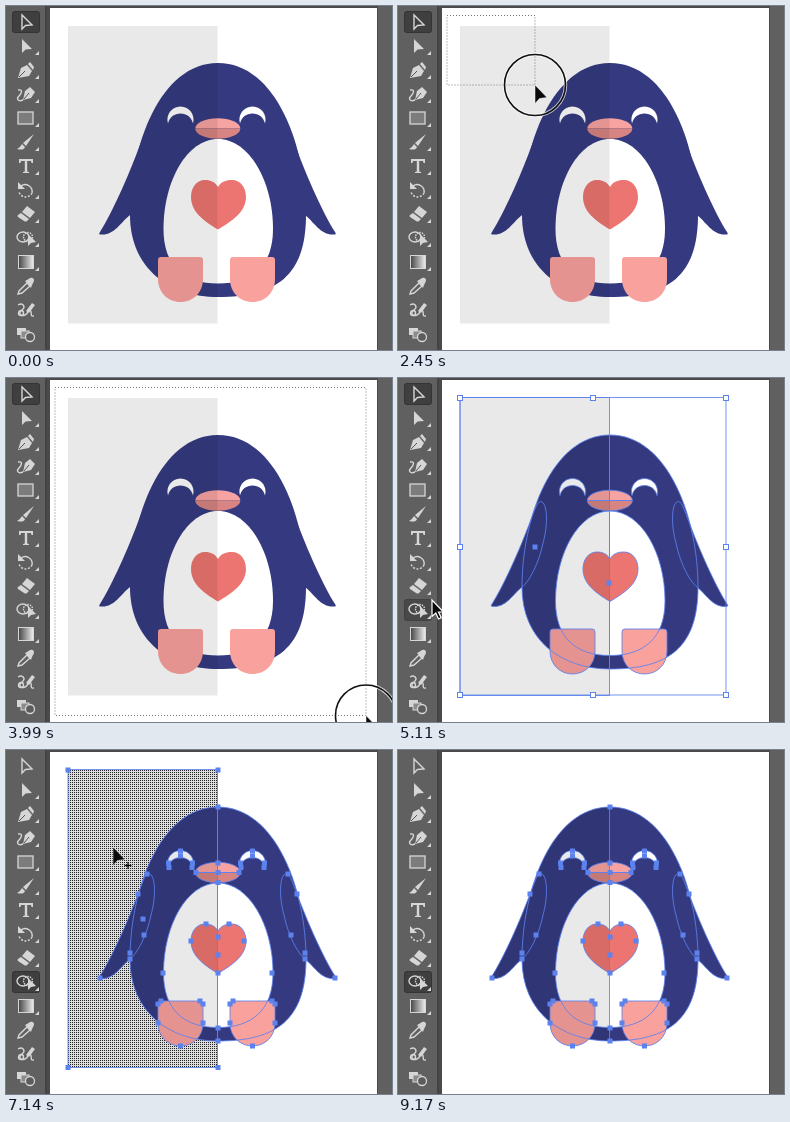
Write an HTML page that moves like this. It is 386 px wide and 344 px high and loops after 9380 ms.

```html
<!DOCTYPE html>
<html lang="en">
<head>
<meta charset="utf-8">
<title>Penguin shape builder</title>
<style>
html, body { margin: 0; width: 100%; height: 100%; overflow: hidden; background: #5f5f5f; }
svg { display: block; width: 386px; height: 344px; }
.icon { fill: #d6d6d6; stroke: none; }
.line { fill: none; stroke: #d6d6d6; stroke-width: 1.4; }
.edge { fill: none; stroke: #5c82ee; stroke-width: 1; stroke-opacity: .85; }
.dot { fill: #5c82ee; }
.handle { fill: #fff; stroke: #5c82ee; }
.tip { font: 11px Inter, "Liberation Sans", sans-serif; fill: #555; }
</style>
</head>
<body>
<svg id="stage" viewBox="0 0 386 344" xmlns="http://www.w3.org/2000/svg"></svg>
<script>
const LOOP = 9380, STEP = 70, AXIS = 211.5;
const stage = document.getElementById('stage');

// Penguin parts
const bodyD = 'M212 57C154 57 124 140 124 209C124 262 163 291 212 291C270 291 300 270 300 209C300 140 270 57 212 57Z';
const bellyD = 'M212 133C181 133 157.500 175 157.500 223C157.500 260 178 277.500 212 277.500S267 260 267 223C267 175 243 133 212 133Z';
const wingD = 'M132 144C136 134 139 123.500 142.500 123.500C150 124 150 148 145 165C141 185 131 204 124 209C114 217 108 230 94 228.500Q92.500 228 94 226C106 207 122 171 132 144Z';
const heartD = 'M212 181C209 176 205 174 199 174C190 174 185 182 185 191C185 206 198 215 212 223.500C226 215 240 206 240 191C240 182 235 174 226 174C219 174 215 176 212 181Z';
const footD = 'M-19.500 251H19.500Q22.500 251 22.500 254V273C22.500 287 12 296 0 296S-22.500 287 -22.500 273V254Q-22.500 251 -19.500 251Z';
const eyeD = 'M-12.500 117.500C-15 109 -9 100.500 0 100.500S15 109 12.500 117.500C11 111 6 107.500 0 107.500S-11 111 -12.500 117.500Z';
const beakTop = 'M189.300 122.500A22.500 10.300 0 0 1 234.300 122.500Z';
const beakLow = 'M189.300 122.500A22.500 10.300 0 0 0 234.300 122.500Z';

const path = (d, fill, move) =>
  `<path d="${d}"${fill ? ` fill="${fill}"` : ''}${move ? ` transform="${move}"` : ''}/>`;
const flip = `translate(${AXIS * 2}) scale(-1 1)`;
const shift = x => `translate(${x})`;
const NAVY = '#353a80', PINK = '#f9a19d';
const pair = (d, fill) => path(d, fill, shift(174.5)) + path(d, fill, shift(246.5));
const wings = fill => path(wingD, fill) + path(wingD, fill, flip);
const solid = path(bodyD, NAVY) + wings(NAVY);
const penguin = solid + path(bellyD, '#fff') + pair(footD, PINK) + pair(eyeD, '#fff') +
  path(beakTop, '#f7a3a1') + path(beakLow, '#d88482') + path(heartD, '#ed7571');
const edges = path(bodyD) + wings() + path(bellyD) + pair(footD) + pair(eyeD) +
  path(beakTop) + path(beakLow) + path(heartD);

// Selection marks
const square = (x, y, s, cls) =>
  `<rect x="${x - s / 2}" y="${y - s / 2}" width="${s}" height="${s}" class="${cls}"/>`;
const dots = list => list.map(([x, y]) => square(x, y, 5, 'dot')).join('');
const sides = [[141, 124], [132, 144], [138, 185], [124, 203], [124, 209], [94, 228],
  [157, 223], [190, 122.5], [185, 191], [200, 174]];
const middle = [57, 113, 122.5, 132.5, 187, 205, 223, 278, 291].map(y => [212, y]);
const local = [[-19.5, 251], [19.5, 251], [-22.5, 254], [22.5, 254], [-22.5, 273], [22.5, 273],
  [0, 296], [-12, 113], [-11.5, 117.5], [12, 113], [11.5, 117.5], [0, 101], [0, 106]];
const anchors = dots([
  ...sides, ...sides.map(([x, y]) => [AXIS * 2 - x, y]), ...middle,
  ...[174.5, 246.5].flatMap(c => local.map(([x, y]) => [c + x, y]))
]);
const handles = [62, 195, 328].flatMap(x => [20, 169, 317].map(y => [x, y]))
  .filter(([x, y]) => x !== 195 || y !== 169)
  .map(([x, y]) => square(x, y, 5, 'handle')).join('');

// Toolbar icons, each around its own centre
const arrowD = 'M-4 -7V7L-.5 3.500L6 3Z';
const icons = [
  `<path class="line" d="${arrowD}"/>`,
  `<path class="icon" d="${arrowD}"/>`,
  '<path class="icon" d="M-8 8L-5 -2L1 -5L6 1L3 6Z"/><path class="icon" d="M2 -6L4 -8L8 -3L7 0Z"/><path d="M-7 7L-1 1" stroke="#555"/>',
  '<path class="icon" d="M-3 6L-1 -3L4 -7L9 -2L5 4Z"/><path d="M-2 5L3 -1" stroke="#555"/><path class="line" d="M-8 -4C-3 -5 -4 -1 -7 2S-8 8 -3 6"/>',
  '<rect x="-8" y="-6" width="15" height="12" fill="#7c7c7c" stroke="#d6d6d6" stroke-width="1.300"/>',
  '<path class="icon" d="M8 -8L0 4L-3 1Z"/><path class="icon" d="M-4 2L-1 5C-2 8 -5 8 -9 7Q-6 6 -4 2Z"/>',
  '<path class="icon" d="M-7 -7H7V-3H5.500L5 -5H1.200V5.500L3 6V7H-3V6L-1.200 5.500V-5H-5L-5.500 -3H-7Z"/>',
  '<path class="line" d="M-5 -4A7 7 0 0 1 6 3"/><path class="line" stroke-dasharray="2 1.500" d="M6 3A7 7 0 0 1 -7 2"/><path class="icon" d="M-8 -8V-1H-1Z"/>',
  '<path class="icon" d="M1 -8L9 -2L4 4L-4 -2Z"/><path class="icon" d="M-5 -1L3 5L1 7Q0 8 -2 7L-8 3Q-9 2 -8 1Z"/>',
  '<ellipse class="line" cx="-3" cy="-1" rx="6" ry="5"/><circle class="line" cx="2" cy="-1" r="4.500" stroke-dasharray="1.500 1"/><path class="icon" d="M2 -4V8L5 5L10 4Z"/>',
  '<rect x="-7.500" y="-6.500" width="15" height="13" fill="url(#fade)" stroke="#d6d6d6"/>',
  '<path class="line" d="M-8 8L-7 5L1 -3L4 0L-4 7Z"/><path class="icon" d="M-1 -5L1 -6L4 -8Q8 -9 8 -5L6 -1L5 2Z"/>',
  '<path class="line" d="M-8 -5C-3 -8 0 -3 -4 0S-6 7 -1 5S1 -2 4 0S3 7 8 6"/><circle class="line" cx="-5" cy="3" r="2.500"/><path class="icon" d="M0 1L6 -7L9 -5L3 3Z"/>',
  '<rect class="icon" x="-9" y="-6" width="9" height="7"/><rect x="-5" y="-3" width="8" height="7" fill="#8b8b8b" stroke="#d6d6d6"/><circle cx="4" cy="3" r="4.500" fill="#5c5c5c" stroke="#d6d6d6" stroke-width="1.300"/>'
];
const iconY = i => i ? 40 + (i - 1) * 24 : 16;
const plainTools = [0, 11, 12, 13];
const toolbar = icons.map((art, i) => {
  const corner = plainTools.includes(i) ? '' : '<path class="icon" d="M13 5V9H9Z"/>';
  return `<g transform="translate(20 ${iconY(i)})">${art}${corner}</g>`;
}).join('');
const button = (id, i) =>
  `<rect id="${id}" x="6.500" y="${iconY(i) - 10.5}" width="27" height="21" rx="2" fill="#3f3f3f" stroke="#343434"/>`;

stage.innerHTML = `
<defs>
  <pattern id="mesh" width="2" height="2" patternUnits="userSpaceOnUse">
    <rect width="2" height="2" fill="#dcdcdc"/><rect width="1" height="1" fill="#222"/>
  </pattern>
  <linearGradient id="fade"><stop stop-color="#444"/><stop offset="1" stop-color="#f0f0f0"/></linearGradient>
  <clipPath id="shape">${solid}${pair(footD, PINK)}</clipPath>
</defs>
<rect width="386" height="344" fill="#606060"/>
<rect x="40" width="332" height="344" fill="#4a4a4a"/>
<rect x="44" y="2" width="327" height="342" fill="#fff"/>
<rect x="39" width="2" height="344" fill="#444"/>
${button('pickBtn', 0)}${button('eraseBtn', 8)}${button('buildBtn', 9)}
${toolbar}
<rect id="shade" x="62" y="20" width="149.500" height="297.500" fill="#e9e9e9"/>
<rect id="hatch" x="62" y="20" width="149.500" height="297.500" fill="url(#mesh)"/>
${penguin}
<rect x="62" y="20" width="149.500" height="298" fill="#000" opacity=".086" clip-path="url(#shape)"/>
<g id="outline" class="edge">${edges}<path d="M211.5 57V291"/></g>
<rect id="panel" class="edge" x="62" y="19.500" width="149.500" height="298"/>
<g id="bounds"><rect class="edge" x="62" y="19.500" width="266" height="297.500"/>${handles}${dots([[137, 169], [211, 205]])}</g>
<g id="points">${anchors}</g>
<g id="corners">${dots([[62, 20], [212, 20], [62, 317.5], [212, 317.5], [137, 169]])}</g>
<rect id="marquee" x="49" y="9.500" fill="none" stroke="#777" stroke-dasharray="1 2"/>
<g id="tooltip"><rect x="29" y="231" width="123" height="17" fill="#c8c8c8"/><text x="36" y="243.500" class="tip">Eraser Tool (Shift+E)</text></g>
<g id="cursor">
  <g id="ring" fill="none"><circle r="30.500" stroke="#fff" stroke-width="3.500" opacity=".7"/><circle r="30.500" stroke="#111" stroke-width="1.600"/></g>
  <path id="toolArrow" d="M0 0V18.500L4.500 13.500L12 12.500Z" fill="#0a0a0a" stroke="#fff" stroke-width=".5"/>
  <path id="sysArrow" d="M0 0V16.500L3.800 13L6.500 19L9.200 17.800L6.500 12H11.500Z" fill="#0a0a0a" stroke="#fff" stroke-width="1.200"/>
  <path id="minus" d="M11.500 18.500H18.500" stroke="#111" stroke-width="1.300"/>
  <path id="plus" d="M15 15V22" stroke="#111" stroke-width="1.300"/>
</g>`;

const el = {};
stage.querySelectorAll('[id]').forEach(n => { el[n.id] = n; });

// Cursor path: time, x, y
const route = [
  [980, 112, -24], [1540, 72, 10], [1890, 48.5, 9.5], [2030, 48.5, 9.5],
  [2450, 137, 79], [3010, 320, 285], [3500, 360, 337.5], [4060, 360, 337.5],
  [4270, 215, 290], [4550, 60, 232], [4690, 60, 232], [5110, 34, 222],
  [5250, 22, 228], [5530, 22, 228], [5950, 24, 206], [6230, 24, 206],
  [6510, 57, 153], [7140, 107, 97], [8540, 107, 97], [8820, 305, 303], [8890, 370, 370]
];

// Slope at a key; zero where the cursor rests
function slope(i, k) {
  const a = route[i - 1], b = route[i], c = route[i + 1];
  if (!a || !c) return 0;
  const before = (b[k] - a[k]) / (b[0] - a[0]);
  const after = (c[k] - b[k]) / (c[0] - b[0]);
  return before * after <= 0 ? 0 : 2 * before * after / (before + after);
}

function cursorAt(t) {
  const last = route.length - 1;
  if (t <= route[0][0]) return route[0].slice(1);
  if (t >= route[last][0]) return route[last].slice(1);
  const i = route.findIndex(p => p[0] > t) - 1;
  const a = route[i], b = route[i + 1], span = b[0] - a[0], u = (t - a[0]) / span;
  const ease = u * u * (3 - 2 * u);
  return [1, 2].map(k => a[k] + (b[k] - a[k]) * ease +
    span * u * (1 - u) * ((1 - u) * slope(i, k) - u * slope(i + 1, k)));
}

const show = (id, on) => { el[id].style.display = on ? '' : 'none'; };

function draw(time) {
  const t = Math.floor((time % LOOP) / STEP) * STEP;
  const during = (a, b = LOOP) => t >= a && t < b;
  const [x, y] = cursorAt(t);
  const overBar = x < 41, building = t >= 5530;

  show('pickBtn', !building);
  show('eraseBtn', during(5740, 6580));
  show('buildBtn', t >= 4900);
  el.eraseBtn.style.opacity = 0.75;
  el.buildBtn.style.opacity = building ? 1 : 0.7;

  show('shade', t < 8190);
  show('hatch', during(6580, 8190));
  show('outline', t >= 4060);
  show('panel', during(4060, 8190));
  show('bounds', during(4060, 5530));
  show('points', building);
  show('corners', during(5530, 8190));

  show('marquee', during(2100, 4060));
  el.marquee.setAttribute('width', Math.max(0, x - 49));
  el.marquee.setAttribute('height', Math.max(0, y - 9.5));

  show('tooltip', during(6300, 6650));
  el.tooltip.style.opacity = Math.min(1, (6650 - t) / 140);

  show('cursor', during(1050, 8890));
  el.cursor.setAttribute('transform', `translate(${x.toFixed(2)} ${y.toFixed(2)})`);
  show('ring', during(1890, 4060));
  show('sysArrow', overBar);
  show('toolArrow', !overBar);
  show('minus', building && !overBar);
  show('plus', building && !overBar && t < 7770);
}

function tick() {
  draw(performance.now());
  requestAnimationFrame(tick);
}
tick();
</script>
</body>
</html>
```
